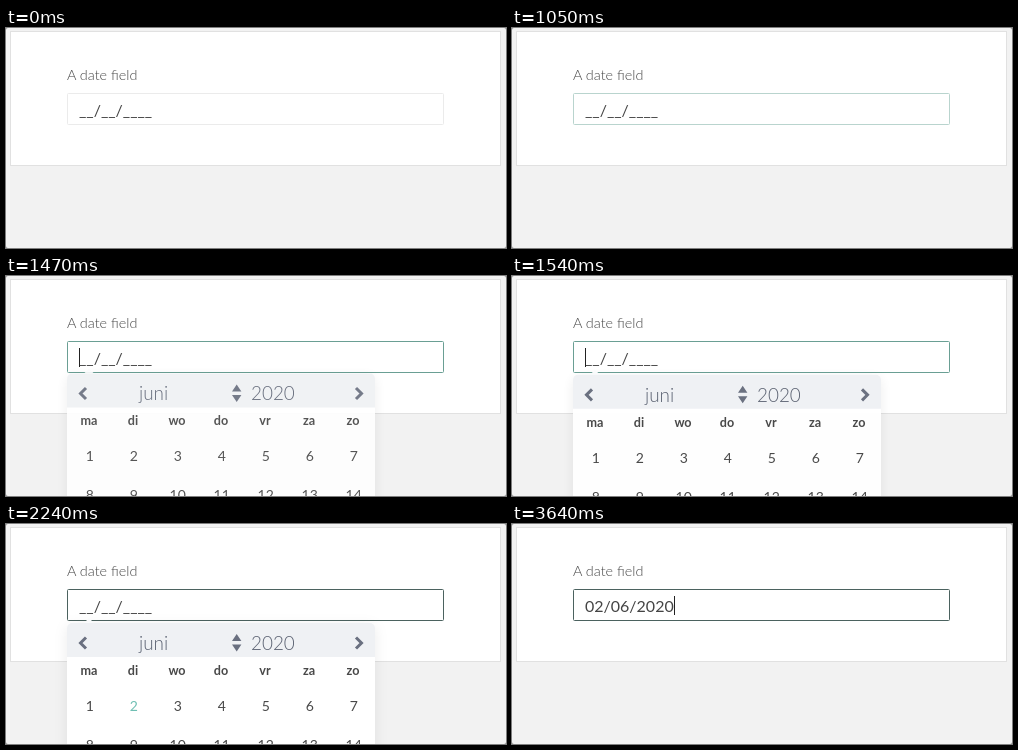
These frames come from a looping animation (500x220 px, 3850 ms). An HTML page:

```html
<!DOCTYPE html>
<html lang="en">
<head>
<meta charset="utf-8">
<title>Date field</title>
<style>
  html, body { margin: 0; width: 100%; height: 100%; overflow: hidden; background: #8a8a8a; }
  svg { display: block; font-family: Lato, sans-serif; }
  .label { font-size: 14.4px; font-weight: 300; fill: #444; }
  .value { font-size: 16px; fill: #444; }
  .month { font-size: 18.9px; font-weight: 300; fill: #5a6171; }
  .weekday { font-size: 12.6px; font-weight: 700; fill: #484848; text-anchor: middle; }
  .day { font-size: 14px; fill: #484848; text-anchor: middle; }
  .panel { fill: #fff; filter: drop-shadow(0 3px 6.5px rgba(0, 0, 0, .08)); }
  .chevron { fill: none; stroke: #6a7080; stroke-width: 3; }
</style>
</head>
<body>
<svg width="500" height="220" viewBox="0 0 500 220">
  <rect width="500" height="220" rx="2" fill="#f2f2f2"/>
  <rect x="4.5" y="3.5" width="490" height="134" fill="#fff" stroke="#e1e1e1"/>
  <text class="label" x="61" y="52">A date field</text>
  <rect id="field" x="61.5" y="65.5" width="376" height="31" rx="1" fill="#fff"/>
  <text id="value" class="value" x="73" y="88"></text>
  <rect id="caret" y="72" width="1" height="19" fill="#222"/>
  <g id="popup">
    <rect class="panel" x="61" y="99" width="308" height="308" rx="5"/>
    <path d="M78 99l5-5 5 5z" fill="#fafbfc"/>
    <path d="M61 133v-29a5 5 0 0 1 5-5h298a5 5 0 0 1 5 5v29z" fill="#eff1f4"/>
    <path class="chevron" d="M80 113.5l-5.5 5.5 5.5 5.5M350 113.5l5.5 5.5-5.5 5.5"/>
    <path d="M226 117l4.7-7 4.7 7zM226 120.5l4.7 7 4.7-7z" fill="#6a7080"/>
    <text class="month" x="133" y="126">juni</text>
    <text class="month" x="245" y="126">2020</text>
  </g>
</svg>
<script>
const $ = id => document.getElementById(id);
const field = $('field'), value = $('value'), caret = $('caret'), popup = $('popup');
const LOOP = 3850, STEP = 70;

function addText(cls, x, y, text) {
  const el = document.createElementNS('http://www.w3.org/2000/svg', 'text');
  el.setAttribute('class', cls);
  el.setAttribute('x', x);
  el.setAttribute('y', y);
  el.textContent = text;
  popup.append(el);
  return el;
}

const columnX = i => 83 + 44 * i;
['ma', 'di', 'wo', 'do', 'vr', 'za', 'zo'].forEach((name, i) => addText('weekday', columnX(i), 151, name));
const days = Array.from({ length: 14 }, (_, i) =>
  addText('day', columnX(i % 7) + .7, 187 + 39 * Math.floor(i / 7), i + 1));

// Latest entry whose start time has passed
const pick = (t, steps) => steps.filter(([start]) => t >= start).pop()[1];

const borders = [
  [0, '#ebebeb'], [1050, '#b9d4ce'], [1120, '#74ada0'], [1470, '#6a9f94'],
  [1960, '#5c857d'], [2030, '#506e69'], [2100, '#4b625f']
];
const hover = [[0, '#484848'], [1960, '#56716c'], [2030, '#65a298'], [2100, '#6fbfb3']];
const carets = [[0, null], [1400, 88], [1470, 73], [2240, null], [2590, 162], [3080, null], [3640, 162]];

function draw(now) {
  const t = Math.floor(now % LOOP / STEP) * STEP;
  field.setAttribute('stroke', pick(t, borders));
  value.textContent = t < 2590 ? '__/__/____' : '02/06/2020';

  const x = pick(t, carets);
  caret.style.display = x === null ? 'none' : '';
  caret.setAttribute('x', x || 0);

  const open = t >= 1400 && t < 2590;
  popup.style.display = open ? '' : 'none';
  if (open) {
    const rest = Math.max(0, 1 - (t - 1350) / 300) ** 5;
    popup.setAttribute('transform', `translate(0 ${-20 * rest})`);
    popup.setAttribute('opacity', 1 - rest);
    days[1].style.fill = pick(t, hover);
  }
}

const begin = performance.now();
function tick() {
  draw(performance.now() - begin);
  requestAnimationFrame(tick);
}
tick();
</script>
</body>
</html>
```
